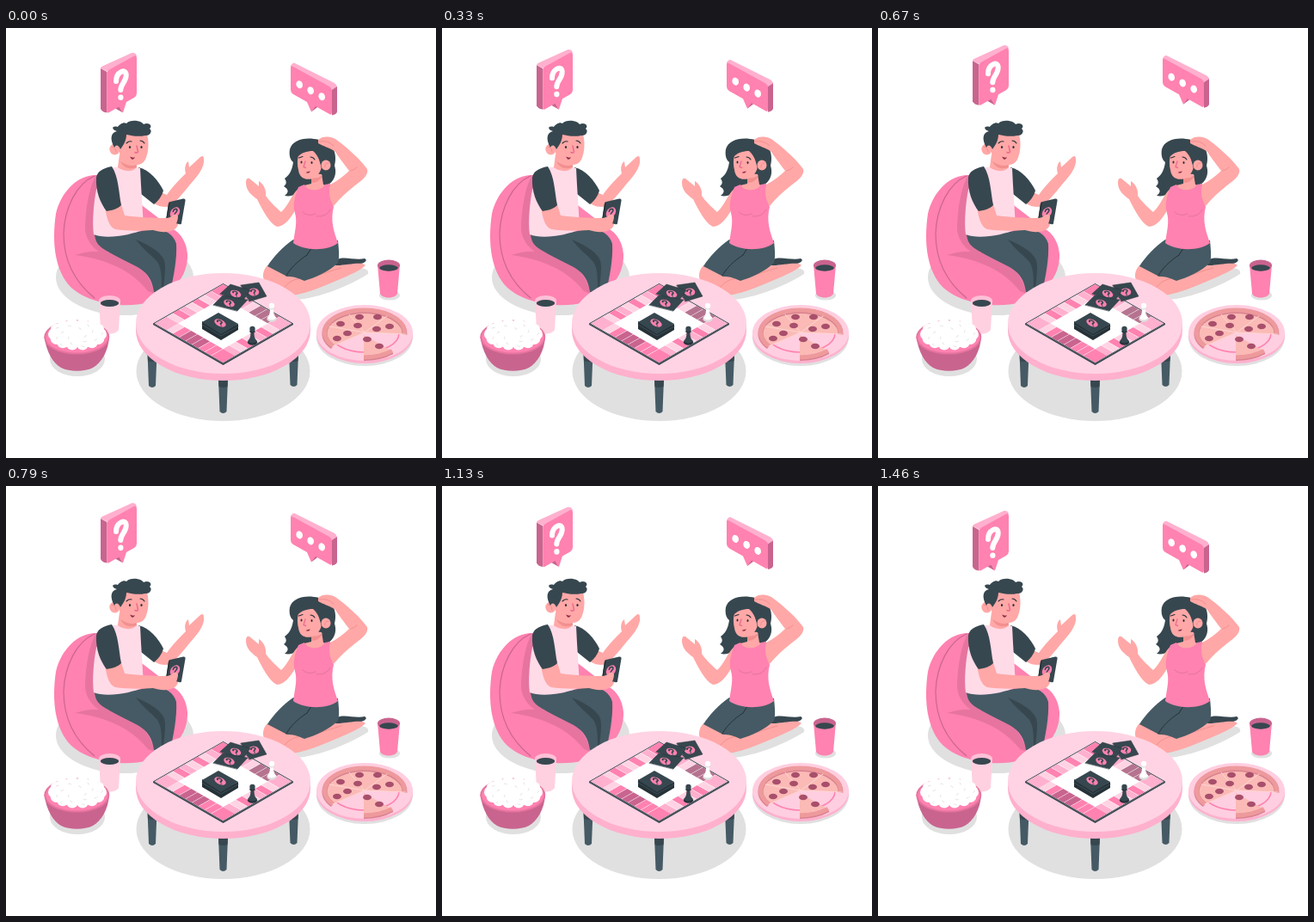
Animation of 500 by 500 pixels, one loop 1.5 s. Source, as an HTML page with a canvas:

```html
<!DOCTYPE html>
<html lang="en">
<head>
<meta charset="utf-8">
<title>Game night</title>
<style>
html, body { margin: 0; width: 100%; height: 100%; overflow: hidden; background: #fff; }
canvas { display: block; width: 500px; height: 500px; }
</style>
</head>
<body>
<canvas id="stage" width="500" height="500"></canvas>
<script>
const screen2d = document.getElementById('stage').getContext('2d');
const LOOP = 1500, LIFT = 9, TAU = Math.PI * 2;
const PINK = '#ff82b0', PALE = '#ffd3e3', SOFT = '#ffb0ce', DEEP = '#c9648f', ROSE = '#e6749f';
const SKIN = '#ffa8a7', BLUSH = '#f28f8f', SLATE = '#455a64', DARK = '#37474f', INK = '#263238', SHADE = '#e0e0e0';

let ctx = screen2d;

function fill(color, d) {
  ctx.fillStyle = color;
  ctx.fill(new Path2D(d));
}

function line(color, width, d) {
  ctx.strokeStyle = color;
  ctx.lineWidth = width;
  ctx.lineCap = ctx.lineJoin = 'round';
  ctx.stroke(new Path2D(d));
}

function oval(color, x, y, rx, ry = rx, turn = 0) {
  ctx.fillStyle = color;
  ctx.beginPath();
  ctx.ellipse(x, y, rx, ry, turn, 0, TAU);
  ctx.fill();
}

function ring(color, width, x, y, rx, ry, from = 0, to = TAU) {
  ctx.strokeStyle = color;
  ctx.lineWidth = width;
  ctx.lineCap = 'butt';
  ctx.beginPath();
  ctx.ellipse(x, y, rx, ry, 0, from, to);
  ctx.stroke();
}

// Pink disc with a question mark, lying in a skewed plane.
function badge(x, y, r, a, b, c, d) {
  ctx.save();
  ctx.transform(a, b, c, d, x, y);
  oval(PINK, 0, 0, r);
  ctx.scale(r / 6, r / 6);
  line(DARK, 1.8, 'M-2.4-1.6C-2.2-5 2.6-4.6 2.3-1.5C2.1 0 0 .2 0 1.8M0 4V4.1');
  ctx.restore();
}

function beanBag() {
  oval(SHADE, 138, 290, 80, 44);
  fill(PINK, 'M106 171C84 170 64 190 58 216C53 250 57 283 76 302C96 320 137 327 165 319C194 311 212 288 211 263C210 249 203 238 193 233L150 200Z');
  fill(ROSE, 'M105 171C97 184 93 207 92 230C91 244 101 258 114 263L150 240L118 170Z');
  fill(ROSE, 'M80 264C100 257 122 259 140 266C157 274 169 292 173 309L165 306C146 281 114 268 80 264Z');
  line(DEEP, 1.1, 'M103 172C82 181 68 209 67 239C67 272 82 297 103 314');
}

function man() {
  fill(SKIN, 'M180 191L187 194C194 184 203 175 209 169C207 162 209 157 212 155L213 162L226 150Q230 147 230 153C231 158 227 167 220 175C211 185 204 195 195 204C188 211 176 208 168 201Z');
  fill(DARK, 'M154 162C167 165 177 177 183 189C181 196 177 201 172 205L157 193Z');
  fill(SLATE, 'M103 237C115 242 150 239 166 234C183 232 195 239 198 251C199 269 195 288 191 307L172 307C170 293 165 285 153 278C139 271 123 263 112 256C105 251 103 245 103 237Z');
  fill(DARK, 'M151 246C163 251 177 258 183 268C187 276 184 290 183 305L181 305C181 290 181 279 176 272C168 263 158 256 151 246Z');
  fill('#ffdbe8', 'M116 164C128 160 146 161 156 163C157 187 159 211 160 234C146 241 116 246 102 240C100 226 102 203 105 188Z');
  fill(SKIN, 'M132 147L152 150L152 162C147 168 136 167 130 162Z');
  fill(BLUSH, 'M133 155C140 160 147 161 152 159L152 162C144 165 137 163 133 155Z');
  fill(SKIN, 'M115 209L133 202L138 218C151 220 172 221 184 221L198 218C202 223 201 231 196 234C188 239 178 237 171 235C157 236 138 236 127 234C119 231 117 219 115 209Z');
  fill(DARK, 'M123 161C112 163 106 167 105 174C104 190 110 204 117 213C124 212 130 210 134 206C131 191 131 173 123 161Z');
  fill(DARK, 'M189 204Q189 202 191 202L206 198.5Q209 198 208.5 201L204 227Q204 229 201 228L186 224Z');
  fill(INK, 'M189 204L191 203L187.5 223L186 224Z');
  badge(196.5, 214.5, 6, .95, -.2, -.1, 1);
  fill(SKIN, 'M178 221C185 221 190 222 195 217Q200 216 200 220C199 228 196 234 187 236Z');
  manHead();
}

function manHead() {
  fill(SKIN, 'M132 124C137 117 156 116 163 121C167 131 166 145 162 153C158 160 151 160 144 158C136 156 133 151 132 145Z');
  oval(SKIN, 126.5, 141, 6.2, 6.5);
  line(BLUSH, 1, 'M123 138Q128 139 128 144');
  fill(DARK, 'M126 139C121 130 121 122 129 120C122 118 123 113 130 115C132 112 137 109 140 111C144 106 157 107 160 112C166 109 171 114 167 117C171 120 167 126 162 125C153 127 146 125 140 124C140 130 137 136 133 141C131 136 128 135 126 139Z');
  oval(INK, 144, 138.5, 1.1, 1.6);
  oval(INK, 157.5, 138.5, 1.1, 1.6);
  line(INK, 1.1, 'M140 134Q143 131 146 132M156 131Q159 131 161 134');
  line('#ec6f92', 1.6, 'M152 137L153.5 144Q152 146 150 144.5');
  fill('#8d2d49', 'M144 149.5Q148 151.5 150 150Q149 153.5 146 152.5Z');
}

function woman() {
  fill(SHADE, 'M315 315C345 322 394 303 421 286C423 278 410 278 395 281L330 301Z');
  fill(DARK, 'M330 141C333 130 348 126 364 130C379 131 386 145 382 160C386 172 379 182 370 184L347 183C341 191 334 197 324 195C329 191 329 188 323 184C327 181 326 178 324 175C331 170 333 163 334 156C330 153 329 147 330 141Z');
  fill(DARK, 'M383 270C393 264 406 271 417 268Q421 270 416 273C403 278 392 274 383 277Z');
  fill(SKIN, 'M304 276C298 282 297 292 303 297C309 304 317 309 324 312C345 311 365 302 391 291C404 285 412 282 418 276C414 271 397 276 385 276L352 274Z');
  line(BLUSH, 1, 'M324 301C331 293 339 290 349 292M352 292C366 286 379 282 390 279');
  fill(SLATE, 'M334 246C322 254 311 266 304 277L327 289C334 289 338 290 347 294C360 290 376 283 386 273C388 266 387 258 386 247Z');
  line(INK, 1, 'M350 264C339 271 330 280 326 288M350 264L355 256');
  fill(SKIN, 'M342 185C333 191 329 206 320 214C313 208 306 201 302 195C303 188 299 181 294 178L294 184L283 175Q279 174 279 180C279 189 286 195 292 199C298 211 306 227 315 231C324 231 331 221 337 211Z');
  fill(SKIN, 'M355 169L367 170L369 182L378 185L375 197L345 197L343 184L355 181Z');
  fill(BLUSH, 'M355 174Q362 176 368 171Q365 180 355 180Z');
  fill(PINK, 'M340 185L347 182C350 190 366 191 371 182L377 181C377 191 379 201 381 208C377 224 381 236 386 250C373 260 346 259 334 250C336 235 339 226 336 215C333 204 336 196 340 185Z');
  line(ROSE, 1, 'M345 214Q351 220 360 216M361 219Q373 220 377 211');
  fill(SKIN, 'M363 130C369 124 381 126 387 132C400 142 413 154 420 164C422 171 414 177 406 183C397 190 388 198 381 207C376 200 375 190 377 182C385 178 393 172 399 166C393 158 386 149 383 144C377 139 369 138 363 134Z');
  line(BLUSH, 1, 'M364 132Q374 130 381 137M401 166Q405 165 408 162');
  womanHead();
}

function womanHead() {
  fill(SKIN, 'M342 143C350 138 364 141 368 150C369 163 364 173 355 175.5C346 177 341 173 340 165C338 156 339 149 342 143Z');
  fill(DARK, 'M338 151C338 141 346 136 357 137C369 139 374 147 372 159L367 164C365 156 364 149 357 143C350 143 343 145 338 151Z');
  oval(SKIN, 372, 159.5, 5.5, 6);
  line(BLUSH, 1, 'M375 157Q370 157 371 162');
  oval(INK, 343.5, 156, 1, 1.5);
  oval(INK, 355.5, 156.5, 1, 1.5);
  line(INK, 1.1, 'M340.5 151L345 149.5M354 150Q357 150 359 153');
  line('#ec6f92', 1.4, 'M348 155L346 161.5L348.5 162.5');
  fill('#8d2d49', 'M348.5 168Q351 166.5 354 166.5Q352 170 348.5 168Z');
}

function bowl() {
  oval(SHADE, 83, 385, 32, 20);
  fill(DEEP, 'M44.5 359C47 377 55 390 64 395C74 400 91 400 101 395C111 389 119 376 120 359Z');
  oval(ROSE, 82.3, 359.5, 38, 20);
  oval(PINK, 82.3, 359.5, 36, 18);
  const puffs = 14;
  for (let i = 0; i < puffs; i++) {
    const a = i / puffs * TAU;
    oval('#fff', 83 + 27 * Math.cos(a), 356 + 12 * Math.sin(a), 7, 6.8);
  }
  oval('#fff', 83, 356, 27, 14);
  for (let i = 0; i < 15; i++) {
    const a = i * 2.4, r = Math.sqrt((i + 1) / 15);
    const x = 83 + 28 * r * Math.cos(a), y = 357 + 13 * r * Math.sin(a);
    ring('#d9d9d9', .7, x, y, 3, 2.5, a, a + 1.4);
  }
}

function glass() {
  fill('#ffd0e0', 'M108 317L110 351C114 357 127 357 131 351L133 317Z');
  oval('#ffc0d7', 120.5, 317, 12.5, 6);
  oval(DARK, 120.5, 320, 10.7, 4);
}

function cup() {
  oval(SHADE, 446, 311, 12, 5.5);
  fill(PINK, 'M432 275L435 309C438 315 452 315 455 309L458 275Z');
  oval(DEEP, 445, 276, 13, 6.5);
  oval(DARK, 445, 279, 10.8, 3.7);
}

function slice(from, to) {
  const cx = 417, cy = 354, deg = TAU / 360;
  ctx.fillStyle = '#fbbab6';
  ctx.beginPath();
  ctx.moveTo(cx, cy);
  ctx.ellipse(cx, cy, 49, 28, 0, from * deg, to * deg);
  ctx.closePath();
  ctx.fill();
  ring('#d9828f', 6, cx, cy + 1, 46.5, 26, from * deg, to * deg);
  ring('#ee9a9d', 5, cx, cy, 46.5, 26, from * deg, to * deg);
}

function pizza() {
  oval(SHADE, 417, 360, 56, 33);
  oval(SOFT, 417, 357, 56, 33);
  oval('#ffcee0', 417, 354.5, 56, 32.5);
  ring(PINK, 1.6, 417, 355, 40, 22);
  slice(143, 363);
  ctx.save();
  ctx.translate(-1, 3);
  slice(45, 90);
  ctx.restore();
  line('#ffd6d2', 1, 'M417 354L376 347M417 354L399 333M417 354L443 335M417 354L465 356M417 354L380 370');
  for (const [x, y] of [[389, 344], [409, 346], [397, 355], [385, 361], [432, 336], [446, 347], [431, 350], [420, 362], [434, 370], [411, 336]])
    oval('#a84f6c', x, y, 5, 3.2);
}

// Maps board coordinates (0..1 along each edge) to the stage.
const onBoard = (u, v) => [171 + 81.5 * (u + v), 343.5 + 46.5 * (u - v)];

function tile(color, u, v, w, h) {
  const corners = [[u, v], [u + w, v], [u + w, v + h], [u, v + h]].map(c => onBoard(...c));
  fill(color, 'M' + corners.join('L') + 'Z');
}

function board() {
  fill(DARK, 'M171 343.5L252.5 390L334 343.5V345L252.5 392L171 345Z');
  tile(DARK, 0, 0, 1, 1);
  const edge = .012, depth = .18, band = depth - edge, count = 7, gap = .006;
  tile('#fff', edge, edge, 1 - 2 * edge, 1 - 2 * edge);
  const size = (1 - 2 * depth) / count;
  const near = [PALE, PINK, DEEP, DEEP, DEEP, PINK, PINK];
  const far = [PALE, PINK, SOFT, PALE, PINK, PALE, SOFT];
  for (let i = 0; i < count; i++) {
    const at = depth + i * size, w = size - gap;
    tile(near[i], at, edge, w, band);
    tile(i > 3 ? '#b5738f' : far[i], at, 1 - depth, w, band);
    tile(far[i], edge, at, band, w);
    tile(far[count - 1 - i], 1 - depth, at, band, w);
  }
  for (const u of [edge, 1 - depth])
    for (const v of [edge, 1 - depth])
      tile(u === v ? SOFT : PINK, u, v, band, band);
}

function card(d, x, y, tilt) {
  fill(DARK, d);
  line(INK, .5, d);
  badge(x, y, 6, 1, tilt, .3, .72);
}

function pawn(x, y, color, shade) {
  oval(shade, x, y - 1.5, 5.6, 3.2);
  fill(color, `M${x - 5.5} ${y - 3}C${x - 2} ${y - 6} ${x - 2} ${y - 10} ${x - 2} ${y - 15}H${x + 2}C${x + 2} ${y - 10} ${x + 2} ${y - 6} ${x + 5.5} ${y - 3}Q${x} ${y + 2} ${x - 5.5} ${y - 3}Z`);
  oval(shade, x, y - 14, 3.3, 1.4);
  oval(color, x, y - 17, 3.2);
}

function leg(x, y, h) {
  fill(SLATE, `M${x - 5.5} ${y}H${x + 5.5}L${x + 4} ${y + h - 2}Q${x} ${y + h + 2} ${x - 4} ${y + h - 2}Z`);
  fill(DARK, `M${x - 5.5} ${y}H${x + 5.5}L${x + 5} ${y + 9}Q${x} ${y + 11} ${x - 5} ${y + 9}Z`);
}

function table() {
  oval(SHADE, 252.5, 399, 101, 58);
  leg(170, 378, 40);
  leg(334.5, 378, 39);
  leg(252.5, 408, 40);
  oval('#ffb0cd', 252.5, 351.5, 101.5, 58.5);
  fill('#ffb0cd', 'M151 343H354V352H151Z');
  oval(PALE, 252.5, 343.5, 101.5, 58.5);
  board();
  card('M273 299L294 296L303 312L283 318Z', 288, 307, -.2);
  card('M249 309L261 298L284 305L274 319Z', 267, 309, .05);
  card('M241 322L252 311L281 316L269 329Z', 259.5, 320, .05);
  fill(INK, 'M228 341L250 354L270 344V351L250 363L228 350Z');
  fill(DARK, 'M228 342L247 331L270 344L250 356Z');
  line(SLATE, .7, 'M228 345L250 358L270 347');
  badge(249, 343, 6.4, 1, .1, .3, .72);
  pawn(309, 340, '#fff', '#dedede');
  pawn(286.5, 367, DARK, INK);
}

function questionBubble() {
  fill(SOFT, 'M110 47Q110 45 113 44L146 29Q150 28 152 32L119 51Z');
  fill(DEEP, 'M110 47L117.5 51V98.5Q112 98 110 94Z');
  fill(DEEP, 'M127 93.5L131.5 91L136 98.5L131.5 96Z');
  fill(PINK, 'M117.5 53Q117.5 50 120 48.5L149 32.5Q152 31 152 35V76Q152 79 149 81L140 86L136 98.5L131.5 91.5L120 98Q117.5 99.5 117.5 96.5Z');
  line('#fff', 6, 'M128 62C128 51 140 46 139.7 55C139.5 63 133.3 65 133.3 72');
  oval('#fff', 133.4, 80.8, 3.1, 3.3);
}

function dotsBubble() {
  fill(SOFT, 'M331 45Q331 42 335 40.5L382 64Q385 66 385 69L379 74Z');
  fill(DEEP, 'M379 72L385 68V97Q385 100 379 101.5Z');
  fill(DEEP, 'M355 97.5L361 93L363 91L358 88Z');
  fill(PINK, 'M331 46Q331 43 334 45L376 68Q379 70 379 73V98Q379 102 376 100L360 91L355 97.5L350 86L334 77Q331 75 331 72Z');
  for (let i = 0; i < 3; i++) oval('#fff', 341.2 + 13 * i, 65.8 + 7 * i, 3.7, 4.6, -.35);
}

// The room never changes, so it is painted once.
function paintRoom() {
  const room = document.createElement('canvas');
  room.width = room.height = 500;
  ctx = room.getContext('2d');
  for (const paint of [beanBag, man, woman, cup, pizza, glass, table, bowl]) paint();
  ctx = screen2d;
  return room;
}

const room = paintRoom();

function draw(now) {
  const phase = now % LOOP / LOOP;
  ctx.fillStyle = '#fff';
  ctx.fillRect(0, 0, 500, 500);
  ctx.drawImage(room, 0, 0);
  ctx.save();
  ctx.translate(0, -LIFT * (1 - Math.cos(phase * TAU)) / 2);
  questionBubble();
  dotsBubble();
  ctx.restore();
  requestAnimationFrame(draw);
}

draw(0);
</script>
</body>
</html>
```
